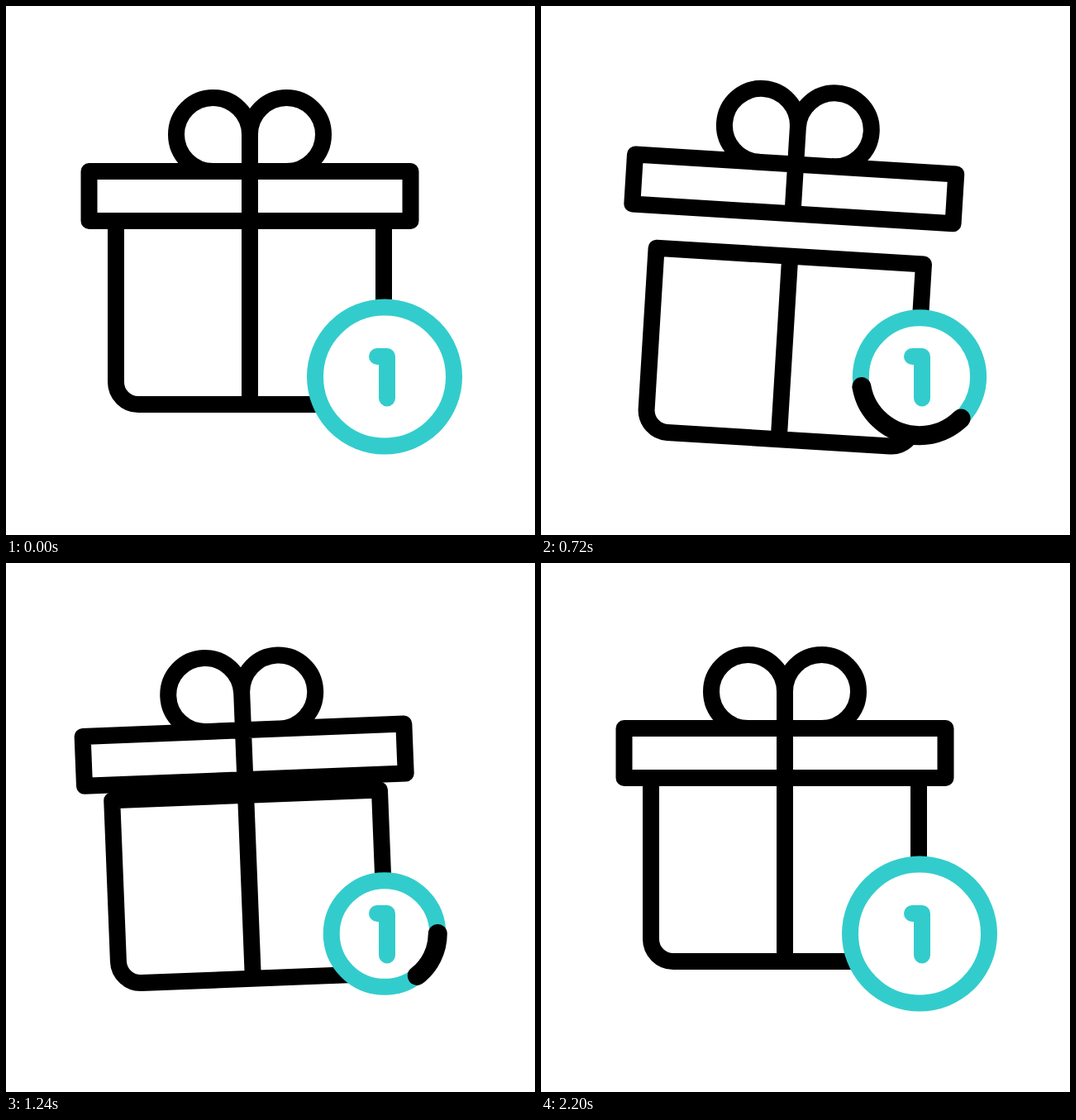
Animation of 640 by 640 pixels, one loop 2440 ms. Source, as an HTML page:

```html
<!DOCTYPE html>
<html lang="en">
<head>
<meta charset="utf-8">
<title>Gift with badge</title>
<style>
  html, body { margin: 0; width: 100%; height: 100%; overflow: hidden; background: #fff; }
  svg { display: block; width: 100%; height: 100%; }
  svg * { fill: none; stroke-width: 20; stroke-linecap: round; stroke-linejoin: round; }
  .black { stroke: #000; }
  .teal { stroke: #3cc; }
  #ring { fill: #fff; }
  svg .arc { stroke-width: 23; }
</style>
</head>
<body>
<svg viewBox="0 0 640 640">
  <g id="gift" class="black">
    <path id="body" d="M133 260V455A27 27 0 0 0 160 482H430A27 27 0 0 0 457 455V260ZM295 260V482"/>
    <path id="lid" d="M100.5 200H489.5V260H100.5ZM295 260V155.5A44.5 44.5 0 1 0 250.5 200M295 155.5A44.5 44.5 0 1 1 339.5 200"/>
  </g>
  <g id="rays" class="teal">
    <path pathLength="360" d="M468 192L483 104"/>
    <path pathLength="360" d="M500 212L563 149"/>
    <path pathLength="360" d="M526 246L614 231"/>
  </g>
  <g transform="translate(458 448.5)">
    <circle id="ring" class="teal"/>
    <circle class="arc black" pathLength="360"/>
    <circle class="arc black" pathLength="360"/>
    <path class="teal" d="M-9 -24.5H3V26"/>
  </g>
</svg>
<script>
const LOOP = 2440, STEP = 40;
const $ = id => document.getElementById(id);
const arcs = document.querySelectorAll('.arc');
const rays = $('rays').children;

// Keys are [time, value] pairs, eased in and out between neighbours.
const TILT = [[260, 0], [680, 3.7], [1085, -3.1], [1540, 0]];
const BODY = [[270, 0], [880, 51.2], [1520, 0]];
const LID = [[260, 0], [480, 8], [800, -12], [960, 48], [1280, 0]];
const RADIUS = [[220, 84], [540, 53], [965, 100], [1310, 60], [1790, 100.5], [2200, 84]];

function track(keys, t) {
  if (t <= keys[0][0]) return keys[0][1];
  for (let i = 1; i < keys.length; i++) {
    const [t0, a] = keys[i - 1], [t1, b] = keys[i];
    if (t < t1) {
      const u = (t - t0) / (t1 - t0);
      return a + (b - a) * u * u * (3 - 2 * u);
    }
  }
  return keys[keys.length - 1][1];
}

const sweep = (t, start, end) => track([[start, 0], [end, 360]], t);

function trim(el, from, to) {
  el.style.display = to - from > 0.1 ? '' : 'none';
  el.style.strokeDasharray = `${to - from} 800`;
  el.style.strokeDashoffset = -from;
}

function draw(t) {
  $('gift').setAttribute('transform', `rotate(${track(TILT, t)} 295 405)`);
  $('body').setAttribute('transform', `translate(0 ${track(BODY, t)})`);
  $('lid').setAttribute('transform', `translate(0 ${track(LID, t)})`);

  const r = track(RADIUS, t);
  $('ring').setAttribute('r', r);
  arcs.forEach((arc, i) => {
    const local = t - 680 * i;
    arc.setAttribute('r', r);
    trim(arc, sweep(local, 577, 1222), sweep(local, 401, 1063));
  });

  for (const ray of rays) trim(ray, sweep(t, 1000, 1220), sweep(t, 900, 1120));
}

const begin = performance.now();
function frame() {
  const t = (performance.now() - begin) % LOOP;
  draw(Math.floor(t / STEP) * STEP);
  requestAnimationFrame(frame);
}
frame();
</script>
</body>
</html>
```
